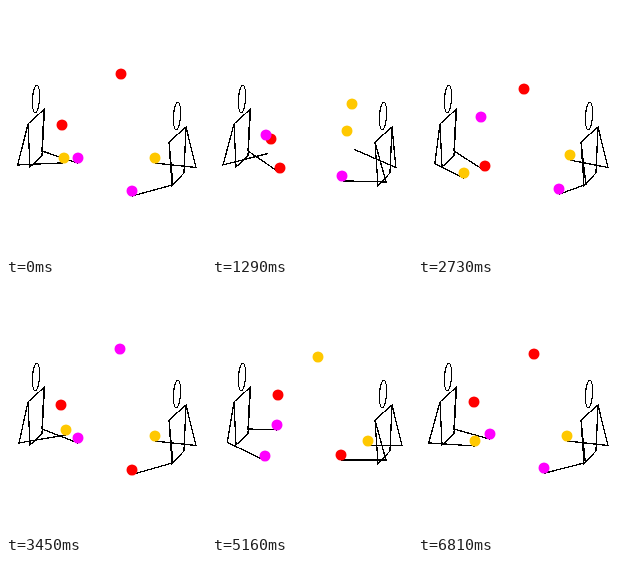
An HTML page that plays this animation: 200 by 250 pixels, repeating every 6840 ms.

```html
<!DOCTYPE html>
<html>
<head>
<meta charset="utf-8">
<title>Passing pattern</title>
<style>
html, body { margin: 0; width: 100%; height: 100%; overflow: hidden; background: #fff; }
svg { display: block; }
.ink { fill: none; stroke: #000; stroke-width: 1.3; shape-rendering: crispEdges; }
.head { stroke-width: 1; vector-effect: non-scaling-stroke; }
</style>
</head>
<body>
<svg id="stage" width="200" height="250" viewBox="0 0 200 250">
  <ellipse class="ink head" rx="3.6" ry="13.5" transform="matrix(1 -.94 0 1 30 93)"/>
  <ellipse class="ink head" rx="3.6" ry="13.5" transform="matrix(1 -.94 0 1 171 110)"/>
  <path class="ink" d="M22 118L38.5 103L36 150L24 161Z"/>
  <path class="ink" d="M163 136L180 121L178 167L166 179.5Z"/>
</svg>
<script>
const FRAME = 30, LOOP = 228, CYCLE = 114, BEAT = 19;
const GRAVITY = 0.275, SLANT = 0.94, FOLLOW_THROUGH = 0.4;

const mod = (a, n) => ((a % n) + n) % n;

// A knot is a place [centre x, height, sideways reach] passed at a speed; times are in frames
const knot = (time, pos, speed) => ({ time, pos, speed });
const selfCatch = t => knot(t, [60.5, 153, 11], [0.6, 1.5, -0.3]);
const selfThrow = t => knot(t, [60.5, 141.5, 3], [0, -5.7, -0.5]);
const passCatch = t => knot(t, [60, 152, 16], [1, 1.5, -1.3]);
const passThrow = t => knot(t, [64, 137, 2.4], [1.8, -6.8, -0.3]);

// The left juggler throws every second beat with each hand: self, self, pass
const leftPath = [
  passThrow(2),
  selfCatch(14), selfThrow(2 + 2 * BEAT),
  selfCatch(14 + 2 * BEAT), selfThrow(2 + 4 * BEAT),
  passCatch(14 + 4 * BEAT)
];
// The right juggler catches a pass, holds it, then passes it back
const rightPath = [
  knot(25, [141, 159, 11], [0.15, 0, 0]),
  knot(57, [139, 161.5, 10], [0, 0.1, 0]),
  knot(71, [142, 166, 12], [0.4, 1.6, -0.9]),
  knot(97, [138, 146, 3], [-1.9, -8, -0.4]),
  knot(109, [142.5, 164.5, 14.5], [-0.3, 1.9, 0.3])
];

// Smooth closed curve through the knots; an empty hand slows down after its throw
function follow(path, time) {
  const t = mod(time, CYCLE), n = path.length;
  let i = path.findLastIndex(k => k.time <= t);
  if (i < 0) i = n - 1;
  const a = path[i], b = path[(i + 1) % n];
  const span = mod(b.time - a.time, CYCLE), u = mod(t - a.time, CYCLE) / span, v = 1 - u;
  const leave = a.speed[1] < 0 ? FOLLOW_THROUGH : 1;
  return a.pos.map((p, j) =>
    p * (1 + 2 * u) * v * v + b.pos[j] * u * u * (3 - 2 * u)
    + span * u * v * (a.speed[j] * leave * v - b.speed[j] * u));
}

// The far hand mirrors the near one half a cycle later
function makeHand(path, far, shoulder, elbow) {
  const at = time => {
    const [c, h, z] = follow(path, far ? time - CYCLE / 2 : time);
    const side = far ? z : -z;
    return { x: c + side, y: h - SLANT * side, c, z };
  };
  return { at, shoulder, elbow };
}
const leftNear = makeHand(leftPath, false, [22, 118],
  p => [p.c - 49.5 + 0.025 * p.z * p.z, 159 - 0.007 * p.z * p.z]);
const leftFar = makeHand(leftPath, true, [38, 103], () => [36, 145]);
const rightNear = makeHand(rightPath, false, [163, 136], p => {
  const drop = Math.min(14, Math.max(0, p.y - 171));
  return [174 - 0.5 * drop, 176 + 0.2 * drop];
});
const rightFar = makeHand(rightPath, true, [180, 121],
  p => [190 - 0.8 * Math.max(0, 146 - p.y), 161.5]);
const hands = [leftNear, leftFar, rightNear, rightFar];

// Throws: [from, time, to, catch time]
const farPass = [[leftFar, 59, rightNear, 109], [rightNear, 211, leftFar, 261]];
const nearPass = [[leftNear, 2, rightFar, 52], [rightFar, 154, leftNear, 204]];
const selfA = [[leftNear, 40, leftFar, 71], [leftFar, 97, leftNear, 128]];
const selfB = [[leftNear, 78, leftFar, 109], [leftFar, 135, leftNear, 166]];
const RED = '#f00', GOLD = '#ffc800', PINK = '#f0f';
const makeBall = (color, legs, period, shift = 0) => ({ color, legs, period, shift });
const balls = [
  makeBall(RED, farPass, LOOP),
  makeBall(RED, selfA, CYCLE),
  makeBall(GOLD, nearPass, LOOP),
  makeBall(GOLD, nearPass, LOOP, CYCLE),
  makeBall(PINK, farPass, LOOP, CYCLE),
  makeBall(PINK, selfB, CYCLE)
];

function place(ball, time) {
  const age = leg => mod(time - ball.shift - leg[1], ball.period);
  const leg = ball.legs.reduce((a, b) => age(a) < age(b) ? a : b);
  const [from, start, to, end] = leg, t = age(leg), flight = end - start;
  if (t >= flight) return to.at(time);
  const p = from.at(start), q = to.at(end), u = t / flight;
  return {
    x: p.x + (q.x - p.x) * u,
    y: p.y + (q.y - p.y) * u - GRAVITY / 2 * t * (flight - t)
  };
}

const stage = document.getElementById('stage');
function add(tag, attrs) {
  const el = document.createElementNS('http://www.w3.org/2000/svg', tag);
  for (const name in attrs) el.setAttribute(name, attrs[name]);
  return stage.appendChild(el);
}
for (const hand of hands) hand.el = add('polyline', { class: 'ink' });
for (const ball of balls) ball.el = add('circle', { r: 5.5, fill: ball.color });

function draw(now) {
  const time = Math.floor(now / FRAME) % LOOP;
  for (const hand of hands) {
    const p = hand.at(time);
    hand.el.setAttribute('points', [hand.shoulder, hand.elbow(p), [p.x, p.y + 5]].join(' '));
  }
  for (const ball of balls) {
    const p = place(ball, time);
    ball.el.setAttribute('cx', Math.round(p.x));
    ball.el.setAttribute('cy', Math.round(p.y));
  }
}

let begin;
function tick(now) {
  begin ??= now;
  draw(now - begin);
  requestAnimationFrame(tick);
}
draw(0);
requestAnimationFrame(tick);
</script>
</body>
</html>
```
